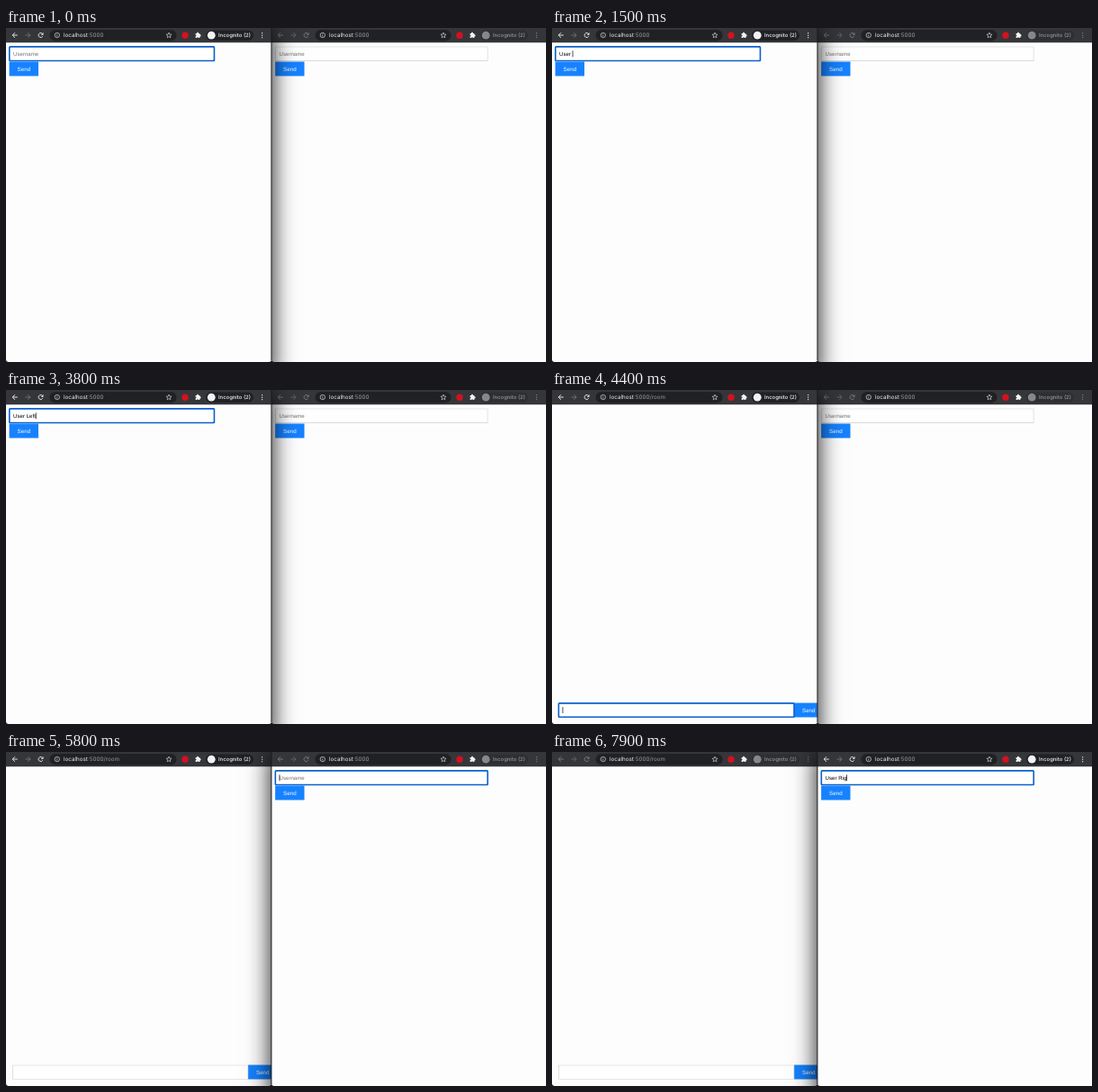
An HTML page with a canvas that plays this animation: 600x372 px, repeating every 8 s.

```html
<!DOCTYPE html>
<html lang="en">
<head>
<meta charset="utf-8">
<title>Two browser windows</title>
<style>
  html, body { margin: 0; width: 100%; height: 100%; overflow: hidden; background: #000; }
  canvas { display: block; width: 600px; height: 372px; }
</style>
</head>
<body>
<canvas id="stage"></canvas>
<script>
const LOOP = 8000, W = 600, H = 372, SPLIT = 295;
const BLUE = '#1682ff', RING = '#0b61cb', PAGE = '#fdfdfd';
const SANS = '"Liberation Sans", Arial, sans-serif';
const UI = 'Inter, Roboto, sans-serif';

const canvas = document.getElementById('stage');
const ctx = canvas.getContext('2d');
const ratio = window.devicePixelRatio || 1;
canvas.width = W * ratio;
canvas.height = H * ratio;

// Key presses: [time, character]
const leftKeys = [[400, 'U'], [700, 's'], [1000, 'e'], [1400, 'r'], [1500, ' '],
                  [1800, 'L'], [2100, 'e'], [2300, 'f'], [2500, 't']];
const rightKeys = [[6500, 'U'], [6700, 's'], [6800, 'e'], [7000, 'r'], [7200, ' '],
                   [7500, 'R'], [7600, 'i'], [7800, 'g']];
const ENTER_ROOM = 4400, SWITCH = 5800, TOOLBAR_SWITCH = 5900;

function typed(keys, t, focusTime) {
  const done = keys.filter(k => k[0] <= t);
  return {
    text: done.map(k => k[1]).join(''),
    since: done.length ? done[done.length - 1][0] : focusTime
  };
}

const between = (t, a, b) => t >= a && t < b;
const caretOn = (t, since) => Math.floor((t - since) / 500) % 2 === 0;

// Text is laid out ten times larger so that small sizes keep exact advances.
function text(str, x, y, size, color, family = SANS, weight = 400) {
  ctx.save();
  ctx.translate(x, y);
  ctx.scale(0.1, 0.1);
  ctx.font = `${weight} ${size * 10}px ${family}`;
  ctx.fillStyle = color;
  ctx.fillText(str, 0, 0);
  const width = ctx.measureText(str).width / 10;
  ctx.restore();
  return width;
}

function box(x, y, w, h, r, fill) {
  ctx.beginPath();
  ctx.roundRect(x, y, w, h, r);
  ctx.fillStyle = fill;
  ctx.fill();
}

function disc(x, y, r, fill) {
  ctx.beginPath();
  ctx.arc(x, y, r, 0, 7);
  ctx.fillStyle = fill;
  ctx.fill();
}

function line(points, color, width = 0.9) {
  ctx.beginPath();
  points.forEach(([x, y]) => ctx.lineTo(x, y));
  ctx.strokeStyle = color;
  ctx.lineWidth = width;
  ctx.stroke();
}

function arrow(x, dir, color) {
  line([[x - 2.8 * dir, 8], [x + 2.8 * dir, 8]], color);
  line([[x, 5.2], [x + 2.8 * dir, 8], [x, 10.8]], color);
}

function reload(x, color) {
  ctx.beginPath();
  ctx.arc(x, 8, 2.5, 0.5, 5.5);
  ctx.strokeStyle = color;
  ctx.lineWidth = 0.9;
  ctx.stroke();
  ctx.beginPath();
  ctx.moveTo(x + 2.9, 4.9);
  ctx.lineTo(x + 2.9, 7.7);
  ctx.lineTo(x + 0.1, 7.7);
  ctx.fillStyle = color;
  ctx.fill();
}

function info(x) {
  ctx.beginPath();
  ctx.arc(x, 8, 2.7, 0, 7);
  ctx.strokeStyle = '#d5d7da';
  ctx.lineWidth = 0.7;
  ctx.stroke();
  box(x - 0.35, 7.6, 0.7, 1.9, 0, '#d5d7da');
  box(x - 0.35, 6.4, 0.7, 0.7, 0, '#d5d7da');
}

function star(x) {
  const points = [];
  for (let i = 0; i <= 10; i++) {
    const a = i * Math.PI / 5 - Math.PI / 2, r = i % 2 ? 1.4 : 3.2;
    points.push([x + r * Math.cos(a), 8.2 + r * Math.sin(a)]);
  }
  line(points, '#d5d7da', 0.65);
}

function puzzle(x) {
  box(x - 2.8, 6, 4.8, 5, 0.6, '#f4f4f5');
  disc(x - 0.4, 5.9, 1.1, '#f4f4f5');
  disc(x + 2.1, 8.4, 1.1, '#f4f4f5');
  disc(x - 2.7, 8.5, 0.8, '#35363a');
  disc(x - 0.4, 11, 0.8, '#35363a');
}

function toolbar(x, width, path, bright) {
  const end = x + width - SPLIT;
  const ink = bright ? '#f1f2f3' : '#7b7d81';
  box(x, 0, width, 16.3, 0, '#35363a');
  arrow(x + 10, -1, ink);
  arrow(x + 24.3, 1, bright ? '#737579' : '#64666a');
  reload(x + 38.6, ink);
  box(x + 48.5, 2, width - 154, 12.4, 6.2, '#202124');
  info(x + 56.8);
  const hostWidth = text('localhost', x + 64, 10.4, 6.3, '#f0f1f2', UI);
  text(':5000' + path, x + 64 + hostWidth, 10.4, 6.3, '#989ba0', UI);
  star(end + 181);
  disc(end + 199, 8.3, 3.7, '#d3121f');
  puzzle(end + 213.4);
  box(end + 222, 2.4, 53, 11.6, 5.8, bright ? '#202124' : '#2e2f33');
  disc(end + 228.2, 8.2, 4.4, bright ? '#f1f2f3' : '#85878b');
  text('Incognito (2)', end + 236, 10.4, 5.9, bright ? '#f5f5f6' : '#94969a', UI, 500);
  for (const y of [5.7, 8.2, 10.7]) disc(end + 284.6, y, 0.65, ink);
}

function field(x, y, w, h, focused) {
  if (focused) {
    box(x - 0.6, y - 0.6, w + 1.2, h + 1.2, 1.6, RING);
    box(x + 1, y + 1, w - 2, h - 2, 0.4, '#fff');
  } else {
    box(x, y, w, h, 0, '#cfcfcf');
    box(x + 0.6, y + 0.6, w - 1.2, h - 1.2, 0, '#fefefe');
  }
}

function sendButton(x, y) {
  box(x, y, 32.4, 16, 0, BLUE);
  text('Send', x + 9, y + 10, 6.2, '#fff');
}

function caret(x, y) {
  box(x, y, 0.7, 7, 0, '#000');
}

function suggestion(x) {
  ctx.save();
  ctx.shadowColor = 'rgba(0,0,0,.3)';
  ctx.shadowBlur = 2 * ratio;
  box(x, 38, 86.5, 22.5, 1, '#fff');
  ctx.restore();
  text('User', x + 5, 51.4, 6.1, '#222');
}

function loginPage(x, width, entry, focused, t, popup) {
  field(x, 20.7, width, 16, focused);
  sendButton(x, 37.5);
  const start = x + 4.5;
  const used = entry.text ? text(entry.text, start, 30.9, 6.1, '#000') : 0;
  if (!entry.text) text('Username', start, 30.9, 6.1, '#757575');
  if (focused && caretOn(t, entry.since)) caret(start + used, 25.2);
  if (popup) suggestion(x);
}

function roomPage(focused, t) {
  sendButton(269, 348.5);
  field(7.2, 348.7, 262, 15.8, focused);
  if (focused && caretOn(t, ENTER_ROOM)) caret(11.6, 353);
}

function windowFrame(x, width, radii, active, content) {
  if (active) {
    ctx.save();
    ctx.shadowColor = 'rgba(0,0,0,.95)';
    ctx.shadowBlur = 25 * ratio;
    box(x, 0, width, H + 20, 0, '#111');
    ctx.restore();
  }
  ctx.save();
  ctx.beginPath();
  ctx.roundRect(x, 0, width, H, radii);
  ctx.clip();
  box(x, 0, width, H, 0, PAGE);
  content();
  ctx.restore();
}

function draw(t) {
  const leftFocus = t < SWITCH, room = t >= ENTER_ROOM;
  const leftBright = t < TOOLBAR_SWITCH;

  const left = () => windowFrame(0, SPLIT, [0, 0, 3, 3], leftFocus, () => {
    toolbar(0, SPLIT, room ? '/room' : '', leftBright);
    if (room) roomPage(leftFocus, t);
    else loginPage(3.6, 228, typed(leftKeys, t, -500), true, t, between(t, 500, 700));
  });

  const right = () => windowFrame(SPLIT, W - SPLIT, [0, 0, 0, 3], !leftFocus, () => {
    toolbar(SPLIT, W - SPLIT, '', !leftBright);
    loginPage(299.1, 236.3, typed(rightKeys, t, SWITCH), !leftFocus, t, between(t, 6600, 6700));
  });

  ctx.setTransform(ratio, 0, 0, ratio, 0, 0);
  ctx.textRendering = 'geometricPrecision';
  box(0, 0, W, H, 0, '#000');
  if (leftFocus) { right(); left(); } else { left(); right(); }
  box(SPLIT - 0.6, 0, 1, H - 2, 0, '#1c1c1e');
}

function tick() {
  draw(performance.now() % LOOP);
  requestAnimationFrame(tick);
}
tick();
</script>
</body>
</html>
```
